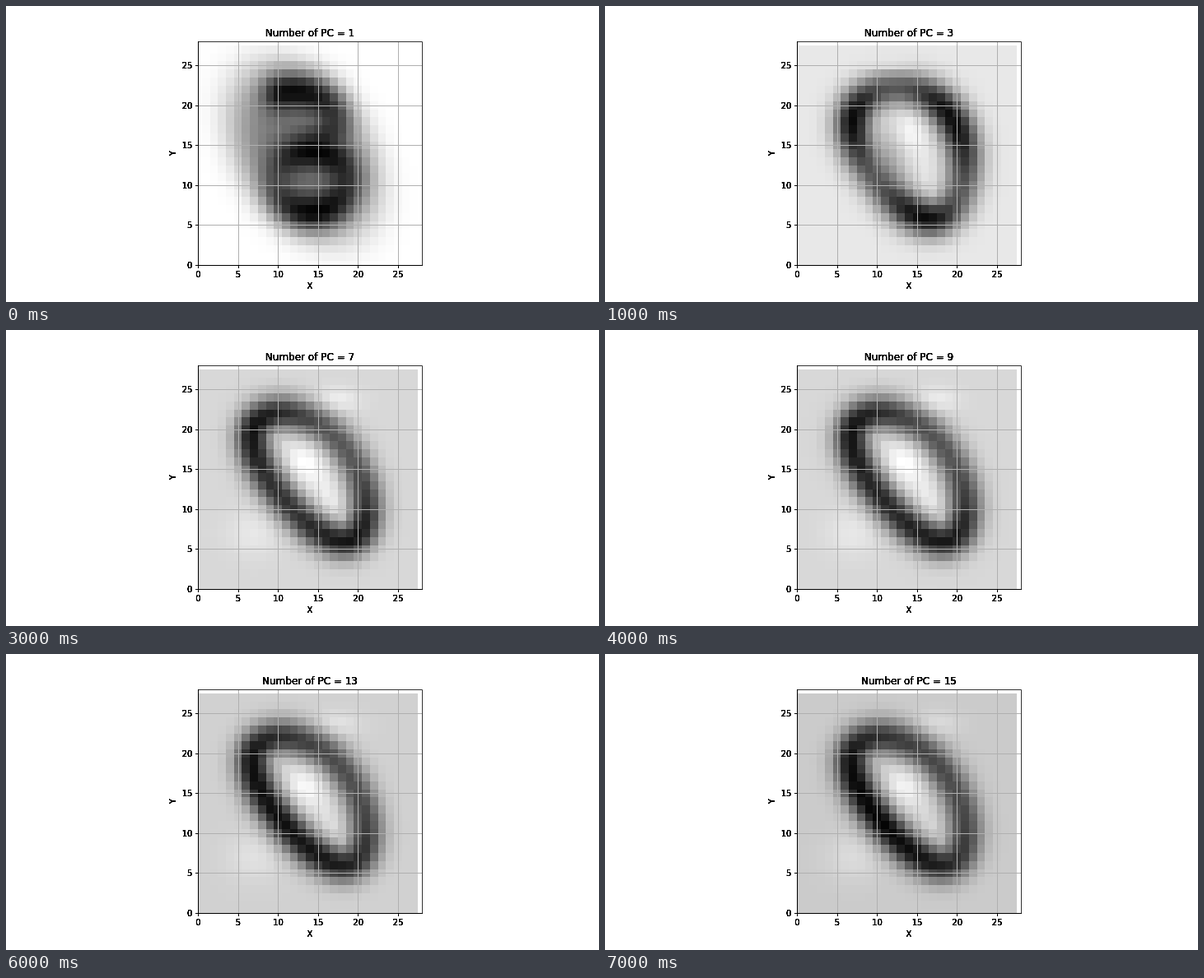
An HTML page with a canvas for the animation above (8000 ms loop, 720 px wide and 360 px high).

```html
<!DOCTYPE html>
<html lang="en">
<head>
<meta charset="utf-8">
<title>Principal components</title>
<style>
  html, body { margin: 0; width: 100%; height: 100%; overflow: hidden; background: #fff; }
  canvas, svg { position: absolute; left: 0; top: 0; display: block; }
  text { font-family: "DejaVu Sans", sans-serif; font-size: 10px; }
  #title { font-size: 12px; }
</style>
</head>
<body>
<canvas id="map" width="720" height="360"></canvas>
<svg width="720" height="360" viewBox="0 0 720 360">
  <!-- Text printed several times over itself: soft edges become solid. -->
  <filter id="overprint" filterUnits="userSpaceOnUse" x="0" y="0" width="720" height="360">
    <feComponentTransfer><feFuncA type="linear" slope="3.5"/></feComponentTransfer>
  </filter>
  <g id="lines" fill="none"></g>
  <g id="labels" filter="url(#overprint)">
    <text id="title" x="369" y="37" text-anchor="middle"></text>
    <text x="369" y="344" text-anchor="middle">X</text>
    <text transform="translate(206 179.2) rotate(-90)" text-anchor="middle">Y</text>
  </g>
</svg>
<script>
const LEFT = 233.1, BASE = 315, CELLS = 28, UNIT = 271.8 / CELLS;
const STEP = 1000, STEPS = 8;
const px = x => LEFT + x * UNIT;
const py = y => BASE - y * UNIT;
const cos = deg => Math.cos(deg * Math.PI / 180);
const $ = id => document.getElementById(id);
const title = $('title');
const ctx = $('map').getContext('2d');

// A soft stroke along a slanted ellipse: lean sets the tilt, bulge pushes
// the long sides up and right, tone gives the grey at each angle.
function arc({ x, y, w, h, lean = 90, bulge = 0, width, tone, from = 0, to = 360 }) {
  const dots = [];
  for (let t = from; t <= to; t += 4) {
    const push = bulge * cos(2 * t - lean);
    dots.push({ x: x + w * cos(t) + push, y: y + h * cos(t - lean) + push, width, tone: tone(t) });
  }
  return dots;
}

const glow = (x, y, sx, sy, amount) => (u, v) =>
  amount * Math.exp(-(((u - x) / sx) ** 2 + ((v - y) / sy) ** 2) / 2);

// Flat-topped slanted shadow.
function shadow(u, v) {
  const x = (u - 13.2) / 8.4, y = (v - 14.2) / 9.8;
  const q = (x * x + y * y + .7 * x * y) / .88;
  return -138 * Math.exp(-.7 * q * q);
}

const three = () => ({
  bg: 255,
  dots: [
    ...arc({ x: 12, y: 18, w: 4.8, h: 3.7, width: 1.7, from: -56, to: 108, tone: t => 30 + 22 * cos(2 * t) }),
    ...arc({ x: 14.2, y: 10.5, w: 4.1, h: 3.8, width: 1.65, tone: t => 30 + 27 * cos(2 * t) - 14 * cos(t) })
  ],
  glows: [shadow]
});

const wideZero = () => ({
  bg: 232,
  dots: arc({
    x: 14.1, y: 14.15, w: 6.9, h: 8.1, lean: 109, bulge: .5, width: 1.65,
    tone: t => 48 - 38 * cos(3 * (t - 45))
  }),
  glows: [glow(14, 16.7, 1.4, 2.2, 28), glow(12, 25, 2.3, .6, 25), glow(12, 13, 1.6, 3.6, -48)]
});

// The dark tips of the ring give way to a dark lower left as k goes from 0 to 1.
const slantedZero = k => ({
  bg: 214 + 14 * k - 25 * k * k,
  dots: arc({
    x: 14.1, y: 14.2, w: 7.1, h: 8, lean: 124, bulge: .35, width: 1.55,
    tone: t => 46 - 8 * k + 30 * (1 - k) * cos(2 * (t - 60)) + (15 + 20 * k) * cos(t - 60 + 15 * k)
  }),
  glows: [
    glow(13.4, 15.8, 2, 2, 42), glow(16.2, 11, 1.8, 2.3, 28 - 14 * k),
    glow(17, 23.6, 2.2, 1.1, 28 - 8 * k), glow(7, 7, 2.4, 2, 16)
  ]
});

const scene = i => i === 0 ? three() : i === 1 ? wideZero() : slantedZero((i - 2) / 5);

function shade({ bg, dots, glows }, x, y) {
  const base = glows.reduce((sum, g) => sum + g(x, y), bg);
  let low = base;
  for (const d of dots) {
    const ink = Math.exp(-((x - d.x) ** 2 + (y - d.y) ** 2) / (2 * d.width ** 2));
    low = Math.min(low, base + (d.tone - base) * ink);
  }
  return Math.round(Math.min(255, Math.max(0, low)));
}

function drawScene(index) {
  const current = scene(index);
  title.textContent = 'Number of PC = ' + (2 * index + 1);
  for (let row = 0; row < CELLS; row++) {
    const top = Math.round(py(row + .5));
    const bottom = Math.round(py(Math.max(0, row - .5)));
    for (let col = 0; col < CELLS; col++) {
      const left = Math.round(px(Math.max(0, col - .5)));
      const right = Math.round(px(col + .5));
      const v = shade(current, col, row);
      ctx.fillStyle = `rgb(${v},${v},${v})`;
      ctx.fillRect(left, top, right - left, bottom - top);
    }
  }
}

function add(parent, tag, attrs, text = '') {
  const el = document.createElementNS('http://www.w3.org/2000/svg', tag);
  for (const key in attrs) el.setAttribute(key, attrs[key]);
  el.textContent = text;
  $(parent).append(el);
}

const snap = v => Math.round(v) + .5;
const line = (d, stroke) => add('lines', 'path', { d, stroke });

for (let n = 0; n <= 25; n += 5) {
  const x = snap(px(n)), y = snap(py(n));
  line(`M${x} 43V315M233 ${y}H505`, '#b0b0b0');
  line(`M${x} 315V319M230 ${y}H234`, '#000');
  add('labels', 'text', { x: px(n) + .4, y: 329.7, 'text-anchor': 'middle' }, n);
  add('labels', 'text', { x: 226.4, y: py(n) + 4, 'text-anchor': 'end' }, n);
}
line('M234 43.5H505.5V315', '#333');
line('M233.5 43V315.5H506', '#000');

let shown = -1;
const start = performance.now();
function tick(now) {
  const index = Math.floor(Math.max(0, now - start) / STEP) % STEPS;
  if (index !== shown) drawScene(shown = index);
  requestAnimationFrame(tick);
}
tick(start);
</script>
</body>
</html>
```
